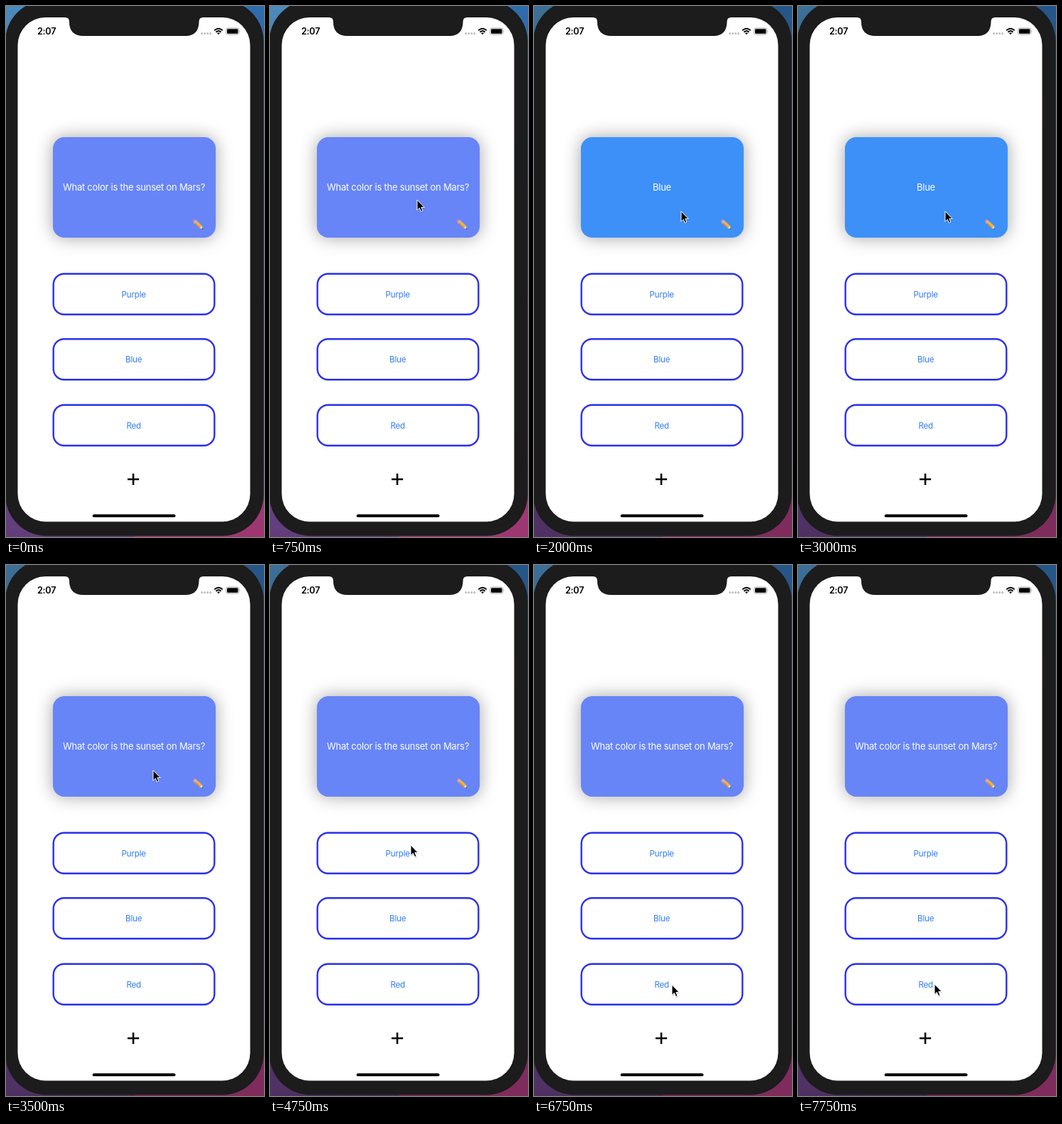
An HTML page for the animation above (8 s loop, 363 by 745 pixels).

```html
<!DOCTYPE html>
<html lang="en">
<head>
<meta charset="utf-8">
<title>Quiz card</title>
<style>
  html, body { margin: 0; width: 100%; height: 100%; overflow: hidden; background: #1c1c1c; }
  svg { display: block; position: absolute; left: 0; top: 0; }
  text { font-family: Inter, Roboto, sans-serif; letter-spacing: -.25px; }
  .mid { text-anchor: middle; }
  .card { position: absolute; left: 65.5px; top: 184px; width: 229px; height: 140.5px; border-radius: 16px;
          background: #6785f7; box-shadow: 0 0 25px rgba(0, 0, 0, .36); }
  .title { font-size: 13px; fill: #fff; }
  .option text { font-size: 11.7px; fill: #2f7ff3; }
  .option rect { fill: #fff; stroke: #2b31ea; stroke-width: 2.4; }

  .card, .ask, .reply, .shade, .cursor, .tap1, .tap2 { animation: 8s step-end infinite; }
  .card { animation-name: flip; }
  .ask { animation-name: ask; }
  .reply { animation-name: reply; }
  .shade { animation-name: shade; }
  .cursor { animation-name: move; }
  .tap1 { animation-name: tap1; }
  .tap2 { animation-name: tap2; }

  @keyframes flip { 0%, 43.75%, 100% { background: #6785f7; } 25% { background: #3d90f7; } }
  @keyframes ask { 0%, 43.75%, 100% { opacity: 1; } 25% { opacity: 0; } }
  @keyframes reply { 0%, 43.75%, 100% { opacity: 0; } 25% { opacity: 1; } }
  @keyframes shade { 0%, 100% { opacity: 0; } 18.75% { opacity: .2; } }
  @keyframes tap1 { 0%, 71.875%, 100% { opacity: 1; } 68.75% { opacity: .8; } }
  @keyframes tap2 { 0%, 96.875%, 100% { opacity: 1; } 87.5% { opacity: .7; } }
  @keyframes move {
    0% { opacity: 0; transform: translate(207px, 270px); }
    6.25% { opacity: 1; transform: translate(207px, 270px); }
    9.375% { transform: translate(207px, 272px); }
    12.5% { transform: translate(207px, 287px); }
    15.625% { transform: translate(207px, 288px); }
    53.125% { transform: translate(207px, 291px); }
    56.25% { transform: translate(199px, 366px); }
    59.375% { transform: translate(198px, 393px); }
    75% { transform: translate(192px, 457px); }
    78.125% { transform: translate(193px, 585px); }
    84.375% { transform: translate(194px, 589px); }
    93.75% { transform: translate(192px, 588px); }
    100% { opacity: 1; transform: translate(192px, 588px); }
  }
</style>
</head>
<body>
<!-- Desktop, phone body and status bar -->
<svg width="363" height="745" viewBox="0 0 363 745">
  <defs>
    <linearGradient id="left" x2="0" y2="1">
      <stop offset="0" stop-color="#4b8abb"/>
      <stop offset="1" stop-color="#643c7c"/>
    </linearGradient>
    <linearGradient id="right" x2="0" y2="1">
      <stop offset="0" stop-color="#2e6cab"/>
      <stop offset="1" stop-color="#a03672"/>
    </linearGradient>
  </defs>
  <rect width="182" height="745" fill="url(#left)"/>
  <rect x="181" width="182" height="745" fill="url(#right)"/>
  <rect class="shade" width="363" height="745" opacity="0"/>
  <rect x="-1" y="-8" width="363.5" height="751.5" rx="58" fill="#1c1c1c"/>
  <rect x="16.5" y="16" width="327" height="707.5" rx="39" fill="#fff"/>
  <path d="M83 15.5V16Q89 16 89 22Q89 42 109 42H252Q271.500 42 271.500 22Q271.500 16 277.500 16V15.500Z" fill="#1c1c1c"/>

  <text x="44" y="40" font-size="12.6" font-weight="600">2:07</text>
  <g fill="#bdbdbd">
    <circle cx="275.700" cy="38.500" r="1.500"/>
    <circle cx="279.700" cy="38.500" r="1.500"/>
    <circle cx="283.700" cy="38.500" r="1.500"/>
    <circle cx="287.700" cy="38.500" r="1.500"/>
  </g>
  <g fill="none" stroke="#000" stroke-width="1.900">
    <path d="M293.300 34.200Q299 29.300 304.700 34.200M295.400 36.700Q299 33.500 302.600 36.700"/>
    <path d="M297 38L299 40.200L301 38Q299 36.500 297 38Z" fill="#000" stroke="none"/>
  </g>
  <rect x="309.700" y="31" width="18" height="9" rx="2.500" fill="none" stroke="#999" stroke-width=".9"/>
  <rect x="311" y="32.200" width="15.400" height="6.600" rx="1.400"/>
  <path d="M328.800 34Q330.200 35.500 328.800 37Z" fill="#999"/>
</svg>

<div class="card"></div>

<!-- Card text, options and pointer -->
<svg width="363" height="745" viewBox="0 0 363 745">
  <g class="title mid">
    <text class="ask" x="180" y="259">What color is the sunset on Mars?</text>
    <text class="reply" x="180" y="259" opacity="0">Blue</text>
  </g>

  <g transform="translate(270.600 306.800) rotate(43)">
    <rect x="-9" y="-2.400" width="3" height="4.800" rx="1.200" fill="#e88a92"/>
    <rect x="-6.500" y="-2.400" width="2" height="4.800" fill="#b9c0c8"/>
    <rect x="-4.500" y="-2.400" width="9" height="4.800" fill="#f3b33d"/>
    <rect x="-4.500" y=".9" width="9" height="1.500" fill="#d98a2b"/>
    <path d="M4.500 -2.400L9.500 0L4.500 2.400Z" fill="#f0d3a8"/>
    <path d="M7.600 -.9L9.500 0L7.600 .9Z" fill="#333"/>
  </g>

  <g class="option mid">
    <rect x="66.700" y="375.700" width="226.600" height="57" rx="15"/>
    <text class="tap1" x="179.700" y="408.600">Purple</text>
    <rect x="66.700" y="467.200" width="226.600" height="57" rx="15"/>
    <text x="179.700" y="500.200">Blue</text>
    <rect x="66.700" y="559.700" width="226.600" height="57" rx="15"/>
    <text class="tap2" x="179.700" y="592.600">Red</text>
  </g>

  <path d="M171 664H187.200M179.100 656V672" stroke="#000" stroke-width="2.500"/>
  <rect x="121.700" y="713.300" width="116.800" height="4" rx="2"/>

  <g class="cursor" opacity="0">
    <path d="M.8 1.500V16L4 13L6.300 18L9 17L6.700 12H11Z" fill="#000" opacity=".2"/>
    <path d="M0 0V14.500L3.300 11.400L5.600 16.500L8 15.500L5.800 10.500H10.200Z" stroke="#fff"/>
  </g>
</svg>
</body>
</html>
```
